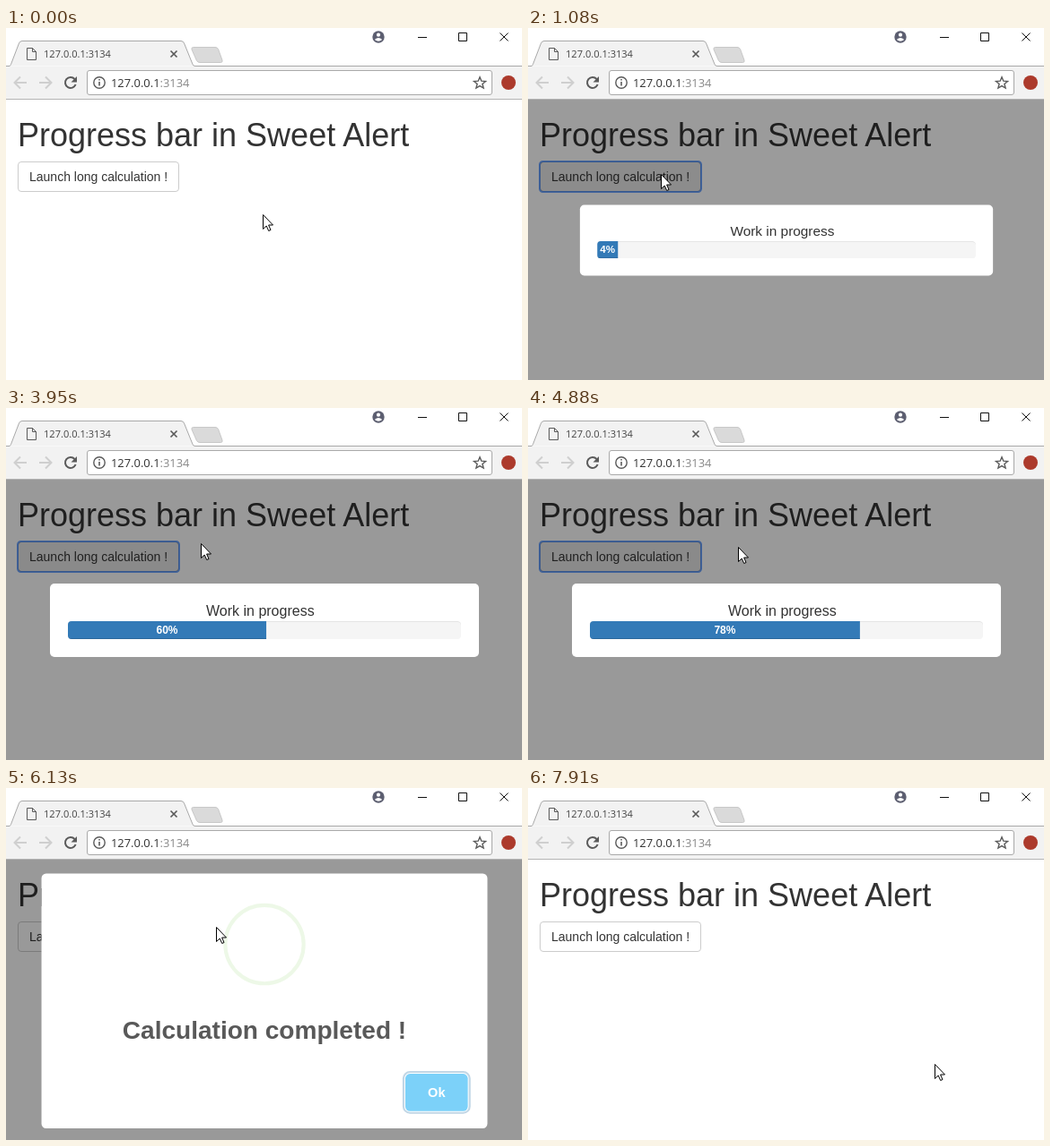
Recreate the animation shown at these times as an HTML page. Size 575 by 393 pixels, loop 8 s.

```html
<!DOCTYPE html>
<html lang="en">
<head>
<meta charset="utf-8">
<title>Progress bar</title>
<style>
html, body { margin: 0; width: 100%; height: 100%; overflow: hidden; background: #fff; }
svg { display: block; font-family: "Liberation Sans", Arial, sans-serif; }
.ui { font-family: "Open Sans", "Noto Sans", sans-serif; }
.line { fill: none; stroke: #5a5a5a; }
</style>
</head>
<body>
<svg width="575" height="393" viewBox="0 0 575 393">
  <defs>
    <clipPath id="barClip"><rect x="69" y="238" width="438" height="20" rx="4"/></clipPath>
  </defs>

  <!-- browser window -->
  <path d="M0 43H575V79H0Z" fill="#f2f2f2"/>
  <path d="M0 42.5H4Q5 42 5.5 40.5L14.5 17Q15.5 14.5 18 14.5H195Q197.500 14.5 198.500 17L208 40.5Q208.500 42.5 211 42.5H575" fill="#f2f2f2" stroke="#a9a9a9"/>
  <path d="M0 79.5H575" stroke="#b4b4b4"/>
  <path d="M208.500 21.500H233Q235.500 21.500 236.500 23.500L241 36Q241.500 38.500 239.500 38.500H216Q213.500 38.500 212.500 36.500L207 24Q206.500 21.500 208.500 21.500Z" fill="#dadada" stroke="#c8c8c8"/>
  <path class="line" d="M23.500 22.500H29.500L33.500 26.500V35.500H23.500ZM29.500 22.500V26.500H33.500" fill="#fff"/>
  <text class="ui" x="42" y="33" font-size="11.05" fill="#444">127.0.0.1:3134</text>
  <path class="line" d="M183.500 25.500L190.500 32.500M190.500 25.500L183.500 32.500" stroke-width="1.7"/>
  <circle cx="415" cy="10" r="6.700" fill="#5c5e70"/>
  <circle cx="415" cy="7.700" r="2.100" fill="#fff"/>
  <path d="M410.800 13Q415 9 419.200 13Q415 16.500 410.800 13Z" fill="#fff"/>
  <path d="M459 10.500H469M504.500 5.500H513.500V14.500H504.500ZM550.500 5.500L559.500 14.500M559.500 5.500L550.500 14.500" fill="none" stroke="#111"/>
  <path d="M23 61H10M16 54.500L9.500 61L16 67.500M37 61H50M44 54.500L50.500 61L44 67.500" fill="none" stroke="#cfcfcf" stroke-width="2"/>
  <path class="line" d="M76.500 57A6 6 0 1 0 77.600 63" stroke-width="2"/>
  <path d="M79 54V60.500H72.500Z" fill="#5a5a5a"/>
  <rect x="90.500" y="47.500" width="451" height="27" rx="2.500" fill="#fff" stroke="#a9a9a9"/>
  <circle class="line" cx="104" cy="61" r="6.200" stroke-width="1.400"/>
  <path class="line" d="M104 60V64.500M104 57V58.600" stroke-width="1.600"/>
  <text class="ui" x="117" y="66" font-size="12.900" fill="#333">127.0.0.1<tspan fill="#888">:3134</tspan></text>
  <path class="line" d="M528 54.800L529.800 59.200L534.500 59.500L530.900 62.500L532.100 67.100L528 64.600L523.900 67.100L525.100 62.500L521.500 59.500L526.200 59.200Z" stroke-width="1.400"/>
  <circle cx="560" cy="61" r="8" fill="#ac3a2c"/>

  <!-- page -->
  <text x="13" y="132" font-size="36" fill="#333">Progress bar in Sweet Alert</text>
  <rect id="launch" x="13.500" y="149.500" width="179" height="33" rx="3.500"/>
  <rect id="focus" x="13" y="149" width="180" height="34" rx="3.500" fill="none" stroke="#4d90fe" stroke-width="2" opacity=".8"/>
  <text x="26" y="171" font-size="14" fill="#333">Launch long calculation !</text>
  <rect id="overlay" y="80" width="575" height="313"/>

  <!-- progress dialog -->
  <g id="work">
    <rect x="49" y="196" width="478" height="82" rx="5" fill="#fff"/>
    <text x="223" y="232" font-size="16" fill="#333">Work in progress</text>
    <g clip-path="url(#barClip)">
      <rect x="69" y="238" width="438" height="20" fill="#f5f5f5"/>
      <rect x="68.500" y="238.500" width="439" height="22" rx="4" fill="none" stroke="#000" stroke-opacity=".07"/>
      <rect id="fill" x="69" y="238" height="20" fill="#337ab7"/>
      <rect id="fillEdge" x="69" y="257" height="1" opacity=".15"/>
    </g>
    <text id="label" y="252" font-size="12" font-weight="bold" fill="#fff" text-anchor="middle"></text>
  </g>

  <!-- success dialog -->
  <g id="done">
    <rect x="49" y="101" width="478" height="273.500" rx="5" fill="#fff"/>
    <circle cx="288" cy="177" r="42" fill="none" stroke="#a5dc86" stroke-opacity=".2" stroke-width="4"/>
    <rect id="tip" height="5" rx="2" fill="#a5dc86"/>
    <rect id="long" height="5" rx="2" fill="#a5dc86"/>
    <text x="288" y="278" font-size="27" font-weight="bold" fill="#595959" text-anchor="middle">Calculation completed !</text>
    <rect x="437" y="314" width="71" height="44" rx="7" fill="none" stroke="#2b72a5" stroke-opacity=".29" stroke-width="2"/>
    <rect id="ok" x="439" y="316" width="67" height="40" rx="5"/>
    <text x="472.500" y="341" font-size="14" font-weight="bold" fill="#fff" text-anchor="middle">Ok</text>
  </g>

  <g id="cursor" fill="#fff" stroke="#000" stroke-linejoin="round">
    <path id="arrow" d="M.5.500V16.500L4.200 13L6.700 18.500L9 17.500L6.600 12H11.500Z"/>
    <path id="hand" transform="translate(-6 0)" d="M5.500 14.500V2a1.500 1.500 0 0 1 3 0V8a1.500 1.500 0 0 1 3 .3a1.500 1.500 0 0 1 3 .6a1.200 1.200 0 0 1 2.300.800V15Q16.800 17.500 15.300 19.500V23H7.300V20Q4 16 1 12.500Q.3 9.800 3 10.700L5.500 13.500M8.500 8V12M11.500 8.500V12M14.500 9V12"/>
  </g>
</svg>
<script>
const LOOP = 8000, OPEN = 830, DONE = 6020, PRESS = 7280, CLOSE = 7360;
const $ = id => document.getElementById(id);
const set = (id, attrs) => {
  for (const k in attrs) $(id).setAttribute(k, attrs[k]);
};
const show = (id, on) => set(id, { visibility: on ? "visible" : "hidden" });
const clamp = x => Math.min(1, Math.max(0, x));

// CSS "ease": cubic-bezier(.25, .1, .25, 1)
function ease(x) {
  let lo = 0, hi = 1;
  const bez = (s, a, b) => 3 * s * (1 - s) * ((1 - s) * a + s * b) + s ** 3;
  for (let i = 0; i < 16; i++) {
    const mid = (lo + hi) / 2;
    if (bez(mid, .25, .25) < x) lo = mid; else hi = mid;
  }
  return x <= 0 ? 0 : x >= 1 ? 1 : bez(lo, .1, 1);
}

// Keyframes [time, ...values], eased within each segment
function track(t, keys) {
  let i = 0;
  while (i < keys.length - 2 && t >= keys[i + 1][0]) i++;
  const [a, b] = [keys[i], keys[i + 1]];
  const p = ease(clamp((t - a[0]) / (b[0] - a[0])));
  return a.slice(1).map((v, j) => v + (b[j + 1] - v) * p);
}

const PATH = [
  [70, 286, 208], [600, 148, 163], [1390, 148, 163], [2130, 217, 151],
  [3950, 217, 151], [4700, 234, 155], [6530, 234, 155], [6970, 483, 343],
  [7440, 483, 343], [7900, 453, 308]
];
const POP = [[0, .5], [135, 1.05], [240, .95], [300, 1]];
const TIP = [[405, 0, 1, 19], [525, 50, -8, 37], [630, 17, 21, 48], [750, 25, 14, 45]];
const LONG = [[487, 0, 46, 54], [630, 55, 0, 35], [750, 47, 8, 38]];

function pop(id, t) {
  const [s] = track(t, POP);
  set(id, { transform: `translate(288 237.500) scale(${s}) translate(-288 -237.500)` });
}

function stroke(id, width, left, top, angle) {
  const x = 248 + left, y = 137 + top;
  set(id, { x, y, width, transform: `rotate(${angle} ${x + width / 2} ${y + 2.5})` });
}

function render(t) {
  const [x, y] = track(t, PATH).map(Math.round);
  const open = t >= OPEN, done = t >= DONE;
  const over = !open && x >= 13 && x < 193 && y >= 149 && y < 183;
  const overOk = done && t < CLOSE && x >= 439 && x < 506 && y >= 316 && y < 356;
  const focused = t >= 780 && !done;

  set("launch", {
    fill: focused && !open ? "#d4d4d4" : over || focused ? "#e6e6e6" : "#fff",
    stroke: focused ? "#8c8c8c" : over ? "#adadad" : "#ccc"
  });
  show("focus", focused);
  set("overlay", { opacity: .4 * (ease(clamp((t - OPEN) / 300)) - ease(clamp((t - CLOSE) / 300))) });

  show("work", open && !done);
  set("work", { opacity: ease(clamp((t - OPEN) / 200)) });
  pop("work", t - OPEN);
  const width = Math.max(24, 4.38 * (18.5 + (t - 2320) * .0196));
  set("fill", { width });
  set("fillEdge", { width });
  set("label", { x: 69 + width / 2 });
  $("label").textContent = 2 * Math.min(50, Math.max(0, Math.floor((t - OPEN) / 102))) + "%";

  show("done", done);
  set("done", { opacity: 1 - ease(clamp((t - CLOSE) / 200)) });
  pop("done", t - DONE);
  const [tw, tl, tt] = track(t - DONE, TIP);
  stroke("tip", tw, tl, tt, 45);
  const [lw, lr, lt] = track(t - DONE, LONG);
  stroke("long", lw, 80 - lr - lw, lt, -45);
  set("ok", { fill: t >= PRESS ? "#70bce0" : overOk ? "#78cbf2" : "#7cd1f9" });

  set("cursor", { transform: `translate(${x} ${y})` });
  show("hand", over || overOk);
  show("arrow", !over && !overOk);
}

const start = performance.now();
(function frame() {
  render((performance.now() - start) % LOOP);
  requestAnimationFrame(frame);
})();
</script>
</body>
</html>
```
